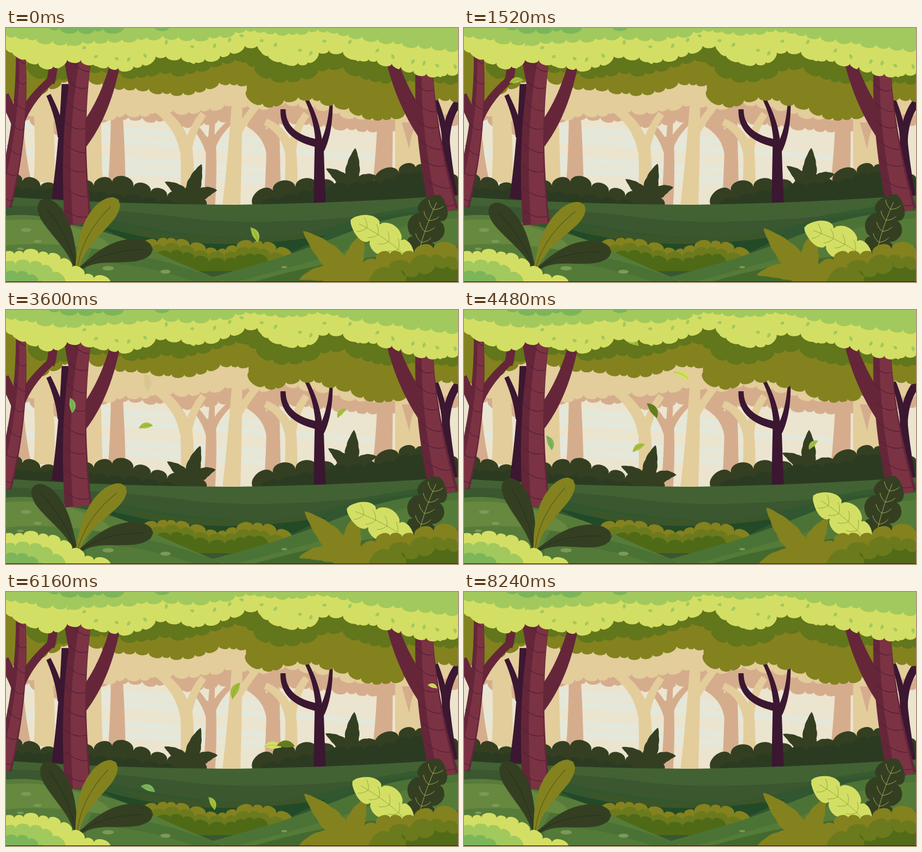
These frames come from a looping animation (788x444 px, 8320 ms). An HTML page with a canvas:

```html
<!DOCTYPE html>
<html lang="en">
<head>
<meta charset="utf-8">
<title>Forest clearing</title>
<style>
html,body{margin:0;width:100%;height:100%;overflow:hidden;background:#eae4cf}
canvas{display:block;width:100vw;height:100vh}
</style>
</head>
<body>
<canvas id="stage"></canvas>
<script>
const W = 788, H = 444, LOOP = 8320, STEP = 80, TAU = Math.PI * 2;
const cv = document.getElementById('stage');
const dpr = window.devicePixelRatio || 1;
cv.width = W * dpr; cv.height = H * dpr;
const g = cv.getContext('2d');

const PINK = '#d5ad8d', TAN = '#e3cd9b', OLIVE = '#83821f', MOSS = '#62761b',
  LIME = '#d3df64', GREEN = '#a2c95e', JADE = '#7db55a', DARK = '#343f22',
  DEEP = '#2b3b21', PURPLE = '#3b1731', WINE = '#652639', ROSE = '#7b3343', BARK = '#57203a';

const cache = {};
const cached = (key, make) => cache[key] || (cache[key] = make());
function fill(color, d) { g.fillStyle = color; g.fill(cached(d, () => new Path2D(d))); }
function random(seed) {
  return () => (seed = (seed * 16807) % 2147483647) / 2147483647;
}

// Height of the polyline p = [x,y, x,y, ...] at x.
function heightAt(p, x) {
  let i = 0;
  while (i < p.length - 4 && x > p[i + 2]) i += 2;
  return p[i + 1] + (p[i + 3] - p[i + 1]) * (x - p[i]) / (p[i + 2] - p[i]);
}

// Foliage along p: seeded bumps about `size` wide, bulging away from `base`.
function scallop(color, p, size, base, seed, bulge = .4) {
  const make = () => {
    const rnd = random(seed * 7919), up = base > p[1] ? 1 : -1, path = new Path2D();
    const end = p[p.length - 2], k = bulge * up, y = x => heightAt(p, x) + up * size * bulge * .4;
    let x0 = p[0], y0 = y(x0);
    path.moveTo(x0, base);
    path.lineTo(x0, y0);
    while (x0 < end) {
      let x1 = x0 + size * (.65 + .7 * rnd());
      if (end - x1 < size * .4) x1 = end;
      const y1 = y(x1), nx = (y1 - y0) * k, ny = (x0 - x1) * k;
      path.bezierCurveTo(x0 + nx, y0 + ny, x1 + nx, y1 + ny, x1, y1);
      x0 = x1; y0 = y1;
    }
    path.lineTo(end, base);
    return path;
  };
  g.fillStyle = color;
  g.fill(cached(color + seed, make));
}

// Shape swept along a quadratic spine s = [x0,y0, cx,cy, x1,y1].
function at(s, u) {
  const v = 1 - u, a = v * v, b = 2 * u * v, c = u * u;
  const dx = v * (s[2] - s[0]) + u * (s[4] - s[2]), dy = v * (s[3] - s[1]) + u * (s[5] - s[3]);
  const l = Math.hypot(dx, dy) || 1;
  return { x: a * s[0] + b * s[2] + c * s[4], y: a * s[1] + b * s[3] + c * s[5], tx: dx / l, ty: dy / l };
}
function blade(color, s, w, prof) {
  const N = 48;
  g.fillStyle = color;
  g.beginPath();
  for (let i = 0; i <= 2 * N + 1; i++) {
    const side = i <= N ? 1 : -1, u = (i <= N ? i : 2 * N + 1 - i) / N;
    const p = at(s, u), r = w * prof(u) * side;
    g.lineTo(p.x - p.ty * r, p.y + p.tx * r);
  }
  g.fill();
}
function vein(color, s, w, ribs = 0, len = 0) {
  g.strokeStyle = color; g.lineWidth = w;
  g.beginPath();
  g.moveTo(s[0], s[1]);
  for (let i = 1; i <= 16; i++) { const p = at(s, i / 18); g.lineTo(p.x, p.y); }
  for (let i = 1; i <= ribs; i++) {
    const { x, y, tx, ty } = at(s, .12 + .66 * i / ribs);
    for (const k of [-len, len]) {
      g.moveTo(x, y);
      g.quadraticCurveTo(x + tx * len * .3 - ty * k * .7, y + ty * len * .3 + tx * k * .7,
        x + tx * len * .9 - ty * k, y + ty * len * .9 + tx * k);
    }
  }
  g.stroke();
}
const paddle = u => (.16 + .84 * Math.sin(Math.min(1, u / .78) * Math.PI / 2) ** 2) *
  Math.sqrt(Math.max(0, 1 - Math.max(0, (u - .78) / .22) ** 2));
const spear = u => Math.sin(Math.PI * Math.pow(u, .8)) ** .8 * (.92 + .08 * Math.abs(Math.sin(u * 15)));
const plain = u => Math.sin(Math.PI * u) ** .9;
const lobed = u => Math.sqrt(Math.max(0, Math.sin(Math.PI * Math.pow(u, 1.1)))) *
  (.6 + .4 * Math.sqrt(Math.abs(Math.sin(u * 3 * Math.PI))));
const limb = (color, s, w0, w1) => blade(color, s, .5, u => w0 + (w1 - w0) * u);

// Two-tone trunk with slanted bark lines.
function trunk(s, w0, w1, rings) {
  limb(WINE, s, w0, w1);
  g.save();
  g.translate(w0 * .18, 0);
  limb(ROSE, s, w0 * .62, w1 * .62);
  g.restore();
  g.strokeStyle = BARK; g.lineWidth = 1.3;
  g.beginPath();
  for (let i = 1; i <= rings; i++) {
    const u = (i - .4) / rings, p = at(s, u), r = (w0 + (w1 - w0) * u) * .46;
    g.moveTo(p.x - r, p.y - 9);
    g.quadraticCurveTo(p.x, p.y + 9, p.x + r, p.y + (i % 2 ? 8 : 2));
  }
  g.stroke();
}

function swing(x, y, a, draw) {
  g.save();
  g.translate(x, y); g.rotate(a); g.translate(-x, -y);
  draw();
  g.restore();
}

function sky() {
  g.fillStyle = '#ebe4cf';
  g.fillRect(0, 0, W, H);
  g.fillStyle = '#e4e8da';
  for (let i = 0; i < 4; i++) {
    const y = 160 + i * 26, x = 30 + (i * 130) % 260;
    g.beginPath();
    g.moveTo(x, y);
    g.lineTo(x + 480, y + 36);
    g.lineTo(x + 480, y + 46);
    g.lineTo(x, y + 14);
    g.fill();
  }
}

function farTrees() {
  limb(PINK, [22, 150, 22, 220, 28, 264], 14, 30);
  limb(PINK, [193, 140, 195, 220, 193, 280], 20, 31);
  limb(PINK, [357, 190, 359, 250, 354, 309], 17, 21);
  limb(PINK, [357, 222, 348, 190, 318, 160], 15, 9);
  limb(PINK, [358, 212, 366, 185, 396, 160], 13, 9);
  limb(PINK, [362, 145, 358, 175, 358, 205], 8, 12);
  limb(PINK, [466, 150, 466, 230, 465, 290], 20, 28);
  limb(PINK, [464, 222, 460, 185, 424, 164], 20, 18);
  limb(PINK, [661, 150, 660, 220, 656, 270], 26, 33);
  scallop(PINK, [0, 150, 50, 162, 85, 188, 130, 165, 230, 156, 270, 166, 285, 153, 310, 175, 390, 158, 430, 174, 500, 165, 560, 172, 630, 180, 700, 176, 788, 170], 20, 90, 3);

  limb(TAN, [63, 120, 70, 210, 66, 270], 32, 36);
  limb(TAN, [153, 140, 153, 220, 155, 280], 25, 28);
  limb(TAN, [313, 190, 317, 240, 317, 290], 20, 25);
  limb(TAN, [314, 215, 304, 168, 262, 140], 22, 15);
  limb(TAN, [317, 210, 324, 178, 344, 150], 15, 12);
  limb(TAN, [403, 125, 399, 230, 393, 309], 18, 31);
  limb(TAN, [400, 190, 415, 162, 440, 132], 14, 12);
  limb(TAN, [496, 200, 498, 240, 497, 286], 18, 23);
  limb(TAN, [496, 222, 488, 180, 452, 164], 18, 12);
  limb(TAN, [498, 218, 502, 180, 524, 150], 15, 12);
  limb(TAN, [701, 140, 700, 200, 702, 260], 44, 46);
  fill(PINK, 'M690,165Q700,200 703,212Q706,185 716,165Z');
  scallop(TAN, [0, 146, 90, 160, 190, 158, 215, 146, 245, 159, 262, 139, 310, 150, 360, 142, 395, 132, 440, 142, 480, 130, 560, 142, 600, 157, 690, 158, 788, 150], 21, 60, 5);
}

function darkPlant(x, y, lean, h, A, C) {
  swing(x, y, -.1 * (A - .12), () => blade(DARK, [x, y, x - 16, y - 24, x - 45, y - 38], 11, spear));
  swing(x, y, .11 * (A - .12), () => blade(DARK, [x, y, x + 20, y - 24, x + 46, y - 23], 11, spear));
  swing(x, y, -.082 * (C + .95), () => blade(DARK, [x - 3, y + 4, x + lean * .2, y - h * .5, x + lean, y - h], 13, spear));
}

function bushes(A, C) {
  scallop(DARK, [0, 257, 45, 264, 62, 276, 145, 275, 165, 268, 183, 262, 202, 268, 233, 274, 262, 285, 350, 304], 30, 330, 7, .5);
  scallop(DEEP, [0, 280, 140, 286, 250, 300, 310, 308], 27, 330, 8);
  darkPlant(322, 307, 19, 69, A, C);
  scallop(DARK, [432, 306, 450, 292, 460, 278, 495, 276, 520, 266, 560, 270, 600, 272, 665, 262, 690, 242, 712, 236, 735, 246, 788, 258], 32, 330, 9, .5);
  darkPlant(603, 284, 6, 74, A, C);
  scallop(DEEP, [446, 306, 540, 282, 600, 274, 670, 268, 700, 252, 788, 266], 29, 330, 10);
}

function ground() {
  fill('#426233', 'M0,295Q180,308 400,309Q600,306 788,292V444H0Z');
  fill('#355b30', 'M788,302Q680,316 540,344Q640,338 788,312Z');
  fill('#3a5730', 'M0,310Q200,316 330,334Q480,350 788,312V444H0Z');
  fill('#30572f', 'M788,318Q650,322 560,350L480,366Q340,374 160,330L120,350L300,420H440L788,360Z');
  fill('#3b5529', 'M180,340Q320,374 480,366L560,352L470,384Q350,396 260,372Z');
  fill('#234a26', 'M160,345Q250,372 330,376Q440,382 560,362L440,420H300Z');
}

function midBush() {
  const edge = [238, 378, 265, 370, 285, 366, 325, 379, 368, 389, 405, 379, 440, 371, 470, 383, 498, 397];
  const tones = [OLIVE, '#6b7a1c', '#4f6a17'];
  tones.forEach((c, i) => scallop(c, edge.map((v, n) => n % 2 ? v + i * 11 : v + (368 - v) * i * .08), 23, 425, 11 + i, .45));
}

function hills() {
  fill('#4c7336', 'M788,319Q690,322 610,352Q540,380 470,404Q400,424 330,444H788Z');
  fill('#557b39', 'M788,332Q690,338 640,372Q570,400 400,444H520Q640,410 788,380Z');
  fill('#44692f', 'M640,400Q540,412 430,444H788V400Z');
  fill('#577c3a', 'M0,328Q60,322 108,343Q200,358 270,396Q330,424 384,444H0Z');
  fill('#66883f', 'M0,336Q70,330 130,352Q190,372 180,390Q80,372 0,380Z');
  fill('#4b7235', 'M150,386Q260,396 372,440L376,444H120Z');
  fill('#537a39', 'M140,410Q230,408 330,444H140Z');
  g.fillStyle = '#7c9a56';
  for (const [x, y, r] of [[35, 353, 9], [55, 373, 7], [25, 386, 6], [178, 420, 10], [278, 426, 9], [485, 418, 5], [539, 430, 5]]) {
    g.beginPath(); g.ellipse(x, y, r, r * .38, 0, 0, TAU); g.fill();
  }
}

function purpleTrees() {
  limb(PURPLE, [103, 98, 101, 200, 90, 299], 12, 21);
  limb(PURPLE, [97, 190, 92, 155, 74, 117], 14, 8);
  limb(PURPLE, [546, 196, 546, 250, 547, 305], 15, 21);
  limb(PURPLE, [545, 202, 482, 190, 483, 142], 14, 9);
  limb(PURPLE, [546, 212, 545, 165, 523, 123], 13, 6);
  limb(PURPLE, [549, 212, 566, 180, 567, 126], 13, 5);
  limb(PURPLE, [766, 185, 768, 230, 778, 294], 13, 18);
  limb(PURPLE, [767, 200, 768, 155, 790, 128], 13, 14);
  limb(PURPLE, [767, 200, 762, 160, 749, 126], 12, 8);
}

function oliveCanopy(A) {
  g.save();
  g.translate(-2 * A, 0);
  scallop(OLIVE, [-10, 130, 20, 130, 75, 106, 110, 90, 152, 90, 185, 106, 245, 106, 268, 114, 318, 116, 348, 107, 374, 94, 400, 101, 450, 90], 19, 0, 14);
  scallop(MOSS, [38, 66, 70, 92, 105, 90, 125, 70, 195, 80, 240, 88, 260, 76, 310, 82, 395, 57, 440, 52], 22, 0, 15);
  g.restore();
  g.save();
  g.translate(-3.5 * A, 0);
  scallop(OLIVE, [420, 112, 430, 130, 465, 140, 482, 128, 520, 120, 560, 132, 598, 140, 612, 151, 645, 162, 690, 156, 718, 132, 750, 124, 794, 128], 21, 0, 16);
  scallop(MOSS, [405, 54, 440, 72, 455, 88, 505, 94, 540, 76, 580, 68, 602, 62, 620, 88, 660, 96, 710, 92, 794, 98], 22, 0, 17);
  g.restore();
}

function wineTrees() {
  limb(WINE, [22, 178, 12, 150, -4, 118], 17, 18);
  limb(WINE, [26, 160, 42, 122, 82, 88], 16, 13);
  limb(WINE, [77, 96, 84, 75, 81, 45], 15, 16);
  trunk([25, 30, 32, 170, -6, 310], 16, 32, 7);

  limb(WINE, [117, 104, 113, 80, 110, 48], 13, 19);
  limb(WINE, [124, 202, 170, 150, 191, 60], 32, 17);
  trunk([134, 48, 111, 180, 126, 343], 31, 47, 8);

  limb(WINE, [738, 188, 694, 132, 671, 52], 34, 19);
  trunk([729, 56, 728, 180, 764, 321], 29, 50, 8);
}

// Observed stations per leaf: [ms, x, y, degrees].
const FALLS = [
  [JADE, 27, [2640, 82, 93, 92], [4480, 150, 232, 70], [6160, 248, 343, 22]],
  ['#a5c13f', 25, [1520, 91, 92, -12], [2640, 169, 166, 25], [4480, 304, 240, -32], [6160, 360, 369, 65]],
  ['#a5c13f', 22, [2640, 558, 118, -50], [4480, 608, 235, -45]],
  [LIME, 31, [4480, 380, 114, 27], [6160, 465, 269, 3], [7360, 576, 357, -6]],
  ['#637d1e', 31, [4480, 329, 175, 56], [6160, 488, 267, 3], [7360, 504, 382, 32]],
  ['#9fbb3b', 32, [4480, 291, 54, 26], [6160, 400, 172, -64], [7360, 414, 308, -8]],
  [LIME, 18, [6160, 744, 164, 18], [7060, 795, 235, 40]],
  ['#a5c13f', 29, [0, 434, 361, 64], [500, 446, 390, 45]]
];
// Smooth curve through the stations, straight beyond both ends.
function glide(k, t, n) {
  const last = k.length - 1;
  const rate = j => {
    const p = k[Math.max(0, j - 1)], q = k[Math.min(last, j + 1)];
    return (q[n] - p[n]) / (q[0] - p[0]);
  };
  if (t <= k[0][0]) return k[0][n] + rate(0) * (t - k[0][0]);
  if (t >= k[last][0]) return k[last][n] + rate(last) * (t - k[last][0]);
  let i = 0;
  while (t > k[i + 1][0]) i++;
  const a = k[i], b = k[i + 1], d = b[0] - a[0], u = (t - a[0]) / d, v = 1 - u;
  return v * v * ((1 + 2 * u) * a[n] + u * d * rate(i)) + u * u * ((1 + 2 * v) * b[n] - v * d * rate(i + 1));
}
function fallingLeaves(t) {
  for (const [color, len, ...k] of FALLS) {
    const from = k[0][0] - 900, to = k[k.length - 1][0] + 600;
    if (t < from || t > to) continue;
    g.save();
    g.globalAlpha = Math.min(1, (t - from) / 250, (to - t) / 250);
    g.translate(glide(k, t, 1), glide(k, t, 2));
    g.rotate(glide(k, t, 3) * Math.PI / 180);
    const s = [-len / 2, 2, 0, -len * .15, len / 2, 2];
    blade(color, s, len * .2, plain);
    vein('rgba(70,100,20,.35)', s, .8);
    g.restore();
  }
}

const CROWN = [0, 37, 50, 62, 88, 72, 108, 53, 150, 62, 200, 74, 245, 65, 256, 49, 310, 53, 328, 60, 385, 49, 405, 33, 438, 29, 455, 46, 490, 62, 524, 65, 545, 41, 602, 42, 612, 55, 660, 60, 705, 76, 742, 85, 788, 80];
function lightCanopy() {
  const rnd = random(4242);
  scallop(LIME, CROWN, 20, 0, 18);
  for (let x = 22; x < W; x += 22 + 26 * rnd()) {
    const y = heightAt(CROWN, x) + 3;
    blade(LIME, [x - 5, y - 24, x - 5, y - 10, x, y], 8, plain);
  }
  scallop(GREEN, [0, 14, 60, 22, 100, 28, 190, 22, 235, 20, 270, 14, 330, 20, 385, 14, 410, 4, 500, 12, 545, 4, 600, 14, 690, 28, 788, 40], 22, 0, 19);
  scallop(JADE, [74, 1, 140, 7, 206, 1], 24, -1, 20);
  scallop(JADE, [258, 1, 286, 1], 26, -1, 21);
  for (let x = 108; x < W; x += 12 + 36 * rnd()) {
    const y = heightAt(CROWN, x) - 12 - 14 * rnd(), a = TAU * rnd(), dx = 4 * Math.cos(a), dy = 5 * Math.sin(a);
    blade(GREEN, [x - dx, y - dy, x + 2, y, x + dx, y + dy], 2.8, plain);
  }
}

function leftPlant(A, B, C) {
  const frond = (color, rib, x, y, a, s) => swing(x, y, a, () => {
    blade(color, s, 20, paddle);
    vein(rib, s, 1);
  });
  frond(DARK, '#23321c', 122, 424, .108 * (A - .12), [124, 430, 112, 362, 60, 301]);
  frond(DARK, '#23321c', 135, 412, .065 * (C + .95), [128, 422, 170, 386, 256, 387]);
  frond(OLIVE, '#4f5a17', 122, 424, -.09 * (B - .43), [123, 430, 130, 356, 196, 300]);
}

function rightPlants(A, C) {
  swing(602, 428, -.08 * (A - .12), () => blade(OLIVE, [612, 440, 560, 418, 511, 440], 15, spear));
  swing(602, 430, .17 * (A - .12), () => blade(OLIVE, [602, 444, 602, 400, 625, 358], 17, spear));
  swing(602, 425, .1 * (C + .95), () => blade(OLIVE, [608, 444, 566, 398, 518, 355], 20, spear));
  fill(OLIVE, 'M570,444Q590,415 604,420Q625,425 640,444Z');

  const leaf = (color, rib, x, y, a, s, w) => swing(x, y, a, () => {
    blade(color, s, w, lobed);
    vein(rib, s, .8, 4, 14);
  });
  leaf(DARK, '#b9bf5a', 720, 402, -.035 * (C + .95), [716, 408, 728, 350, 757, 292], 33);
  leaf(LIME, '#8f9c36', 700, 400, .125 * (A - .12), [710, 412, 668, 366, 601, 335], 29);

  const edge = [618, 440, 638, 404, 665, 388, 700, 396, 735, 378, 788, 388];
  const tones = [OLIVE, '#6b7a1c', '#516b18'];
  tones.forEach((c, i) => scallop(c, edge.map((v, n) => n % 2 ? v + i * 18 : v + (792 - v) * i * .12), 30, 460, 22 + i, .48));
}

function cornerBush() {
  const edge = [-6, 394, 40, 390, 85, 395, 108, 410, 125, 426, 182, 444];
  [LIME, GREEN, JADE].forEach((c, i) => scallop(c, edge.map((v, n) => n % 2 ? v + i * 18 : v * (1 - i * .22)), 20, 470, 25 + i, .45));
}

function draw(t) {
  const ph = t / 2000;
  const A = Math.asin(.95 * Math.sin(TAU * (ph + .02))) / Math.asin(.95);
  const B = Math.sin(TAU * (ph + .07));
  const C = -Math.cos(TAU * (ph + .05));
  g.setTransform(cv.width / W, 0, 0, cv.height / H, 0, 0);
  sky();
  farTrees();
  bushes(A, C);
  ground();
  midBush();
  hills();
  purpleTrees();
  oliveCanopy(A);
  wineTrees();
  fallingLeaves(t);
  lightCanopy();
  leftPlant(A, B, C);
  cornerBush();
  rightPlants(A, C);
  g.fillStyle = '#1c2416';
  g.fillRect(0, 443, W, 1);
}

const start = performance.now();
function tick() {
  const t = (performance.now() - start) % LOOP;
  draw(Math.floor(t / STEP) * STEP);
  requestAnimationFrame(tick);
}
tick();
</script>
</body>
</html>
```
